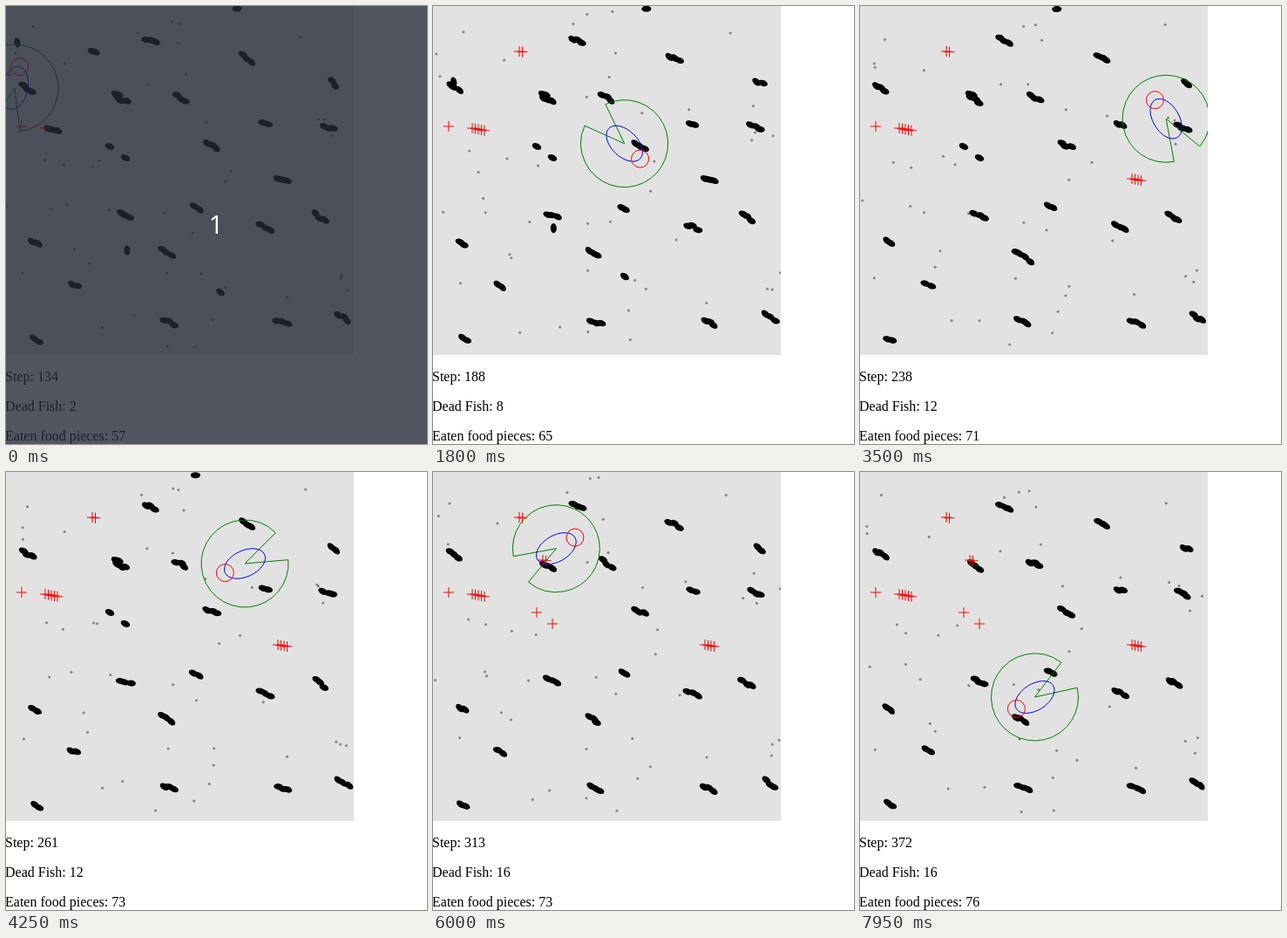
Write an HTML page with a canvas that moves like this. It is 483 by 502 pixels and loops after 8000 ms.

```html
<!DOCTYPE html>
<html lang="en">
<head>
<meta charset="utf-8">
<title>Fish simulation</title>
<style>
  html, body { margin: 0; width: 100%; height: 100%; overflow: hidden; background: #fff; }
  canvas { position: absolute; left: 0; top: 0; }
  p { position: absolute; left: -1px; margin: 0; font: 16px/18px "Liberation Serif", serif; color: #000; white-space: pre; }
  #step { top: 416px; }
  #dead { top: 450px; }
  #eaten { top: 484px; }
  #countdown {
    position: absolute; inset: 0; background: rgba(36, 41, 54, .79); color: #fff;
    font: 30px/40px "Open Sans", sans-serif; text-align: center;
  }
  #countdown span { position: absolute; left: 0; width: 482px; top: 230px; }
</style>
</head>
<body>
<canvas id="tank" width="399" height="400"></canvas>
<p id="step"></p>
<p id="dead"></p>
<p id="eaten"></p>
<div id="countdown"><span>1</span></div>
<script>
const LOOP = 8000, TICK = 50, SPEED = 0.147, FOOD = 45;
const TAU = Math.PI * 2, rad = Math.PI / 180;
const byId = id => document.getElementById(id);
const ctx = byId('tank').getContext('2d');

// Hunter's turning points: time, x, y, heading, step counter, food counter
const route = [
  [0, 10, 94, -77, 134, 57],
  [950, 132, 69, 38, 163, 62],
  [2700, 324, 196, -14, 214, 70],
  [4250, 274, 105, 155, 261, 73],
  [5100, 172, 173, 173, 286, 73],
  [5700, 120, 120, 275, 304, 73],
  [6900, 260, 121.5, 71, 341, 75],
  [7950, 200.5, 258, 147.5, 372, 76]
];

// Catches: x, y, time, number of fish; those of one catch lie side by side
const catches = [
  [18, 138, 0, 1], [45, 140, 0, 5], [99, 52, 580, 2], [312, 198, 2380, 4],
  [137, 174, 5080, 1], [119, 161, 5250, 1], [126, 101, 5680, 2]
];
const prey = catches.flatMap(([x, y, time, count]) =>
  Array.from({ length: count }, (_, k) => ({ x: x + 3.5 * k, y: y + 0.7 * k, time: time + 40 * k })));

const schools = [
  [166, 40], [277, 60], [375, 88], [200, 105], [132, 107], [298, 135], [370, 139],
  [237, 160], [137, 240], [219, 231], [298, 253], [360, 242], [33, 271], [184, 283],
  [78, 320], [187, 362], [317, 363], [35, 382], [24, 94], [387, 357]
];

// Lone swimmers: start, end, time of arrival
const strays = [
  [265, 3, 200, 4, 5800], [139, 280, 138, 242, 2700],
  [246, 328, 188, 288, 4000], [13, 42, 25, 92, 2000]
];

const noise = n => { const s = Math.sin(n * 127.1 + 3.7) * 43758.5453; return s - Math.floor(s); };
const mix = (a, b, u) => a + (b - a) * u;
const wave = (t, seed) =>
  Math.sin(t / 1000 * (0.6 + noise(seed)) + TAU * noise(seed + 0.5));

function hunterAt(t) {
  const next = route.findIndex(r => t <= r[0] && r[0] > 0);
  const [t0, x0, y0, h0, step0, food0] = route[next - 1];
  const [t1, x1, y1, h1, step1, food1] = route[next];
  const u = (t - t0) / (t1 - t0), pull = SPEED * (t1 - t0);
  // Cubic Hermite: value and slope
  const curve = (a, b, m, n) => {
    const c = 3 * (b - a) - 2 * m - n, d = 2 * (a - b) + m + n;
    return [a + u * (m + u * (c + u * d)), m + u * (2 * c + 3 * u * d)];
  };
  const [x, dx] = curve(x0, x1, pull * Math.cos(h0 * rad), pull * Math.cos(h1 * rad));
  const [y, dy] = curve(y0, y1, pull * Math.sin(h0 * rad), pull * Math.sin(h1 * rad));
  return {
    x, y, heading: Math.atan2(dy, dx),
    step: Math.round(mix(step0, step1, u)),
    eaten: Math.floor(mix(food0, food1, u))
  };
}

function ellipse(x, y, rx, ry, angle = 0) {
  ctx.beginPath();
  ctx.ellipse(x, y, rx, ry, angle, 0, TAU);
}

function drawOne(x, y, angle) {
  ellipse(x, y, 5.6, 3.5, angle);
  ctx.fill();
}

function drawSchool([x, y], i, t) {
  const angle = (20 + 15 * noise(i) + 4 * wave(t, i + 9)) * rad;
  const size = noise(i + 70) < 0.25 ? 2 : 3;
  for (let k = 0; k < size; k++) {
    const seed = i * 5 + k;
    const along = 5.8 * (k - (size - 1) / 2) + wave(t * 2, seed);
    const across = 1.3 * wave(t * 2, seed + 40);
    const c = Math.cos(angle), s = Math.sin(angle);
    drawOne(x + along * c - across * s, y + along * s + across * c,
      angle + 0.2 * wave(t * 2, seed + 80));
  }
}

function drawFish(t) {
  ctx.fillStyle = '#000';
  schools.forEach((home, i) => drawSchool(home, i, t));
  for (const [x0, y0, x1, y1, arrival] of strays) {
    if (t < arrival)
      drawOne(mix(x0, x1, t / arrival), mix(y0, y1, t / arrival), Math.atan2(y1 - y0, x1 - x0));
  }
  for (const { x, y, time } of prey) if (t < time) drawOne(x, y, 25 * rad);
}

function drawFood(t) {
  ctx.fillStyle = '#808080';
  for (let i = 0; i < FOOD; i++) {
    const drift = seed => 8 * wave(t, seed) + noise(seed + t / TICK * 0.37);
    ellipse(399 * noise(i + 500) + drift(i + 300), 400 * noise(i + 600) + drift(i + 400), 1.5, 1.5);
    ctx.fill();
  }
}

function drawCrosses(list) {
  ctx.strokeStyle = '#f00';
  ctx.beginPath();
  for (const { x, y } of list) {
    ctx.moveTo(x - 6, y);
    ctx.lineTo(x + 6, y);
    ctx.moveTo(x, y - 6);
    ctx.lineTo(x, y + 6);
  }
  ctx.stroke();
}

function drawHunter({ x, y, heading }) {
  const sight = 160 * rad;
  ctx.strokeStyle = '#008000';
  ctx.beginPath();
  ctx.moveTo(x, y);
  ctx.arc(x, y, 50, heading - sight, heading + sight);
  ctx.closePath();
  ctx.stroke();
  ctx.strokeStyle = '#00f';
  ellipse(x, y, 25, 15, heading);
  ctx.stroke();
  ctx.strokeStyle = '#f00';
  ellipse(x + 25 * Math.cos(heading), y + 25 * Math.sin(heading), 10, 10);
  ctx.stroke();
}

function render(t) {
  const hunter = hunterAt(t), dead = prey.filter(fish => fish.time <= t);
  ctx.fillStyle = '#e2e2e2';
  ctx.fillRect(0, 0, 399, 400);
  drawFood(t);
  drawFish(t);
  drawCrosses(dead);
  drawHunter(hunter);
  byId('step').textContent = `Step: ${hunter.step}`;
  byId('dead').textContent = `Dead Fish: ${dead.length}`;
  byId('eaten').textContent = `Eaten food pieces: ${hunter.eaten}`;
  byId('countdown').style.display = t < TICK ? 'block' : 'none';
}

const start = performance.now();
function frame() {
  const t = (performance.now() - start) % LOOP;
  render(Math.floor(t / TICK) * TICK);
  requestAnimationFrame(frame);
}
frame();
</script>
</body>
</html>
```
